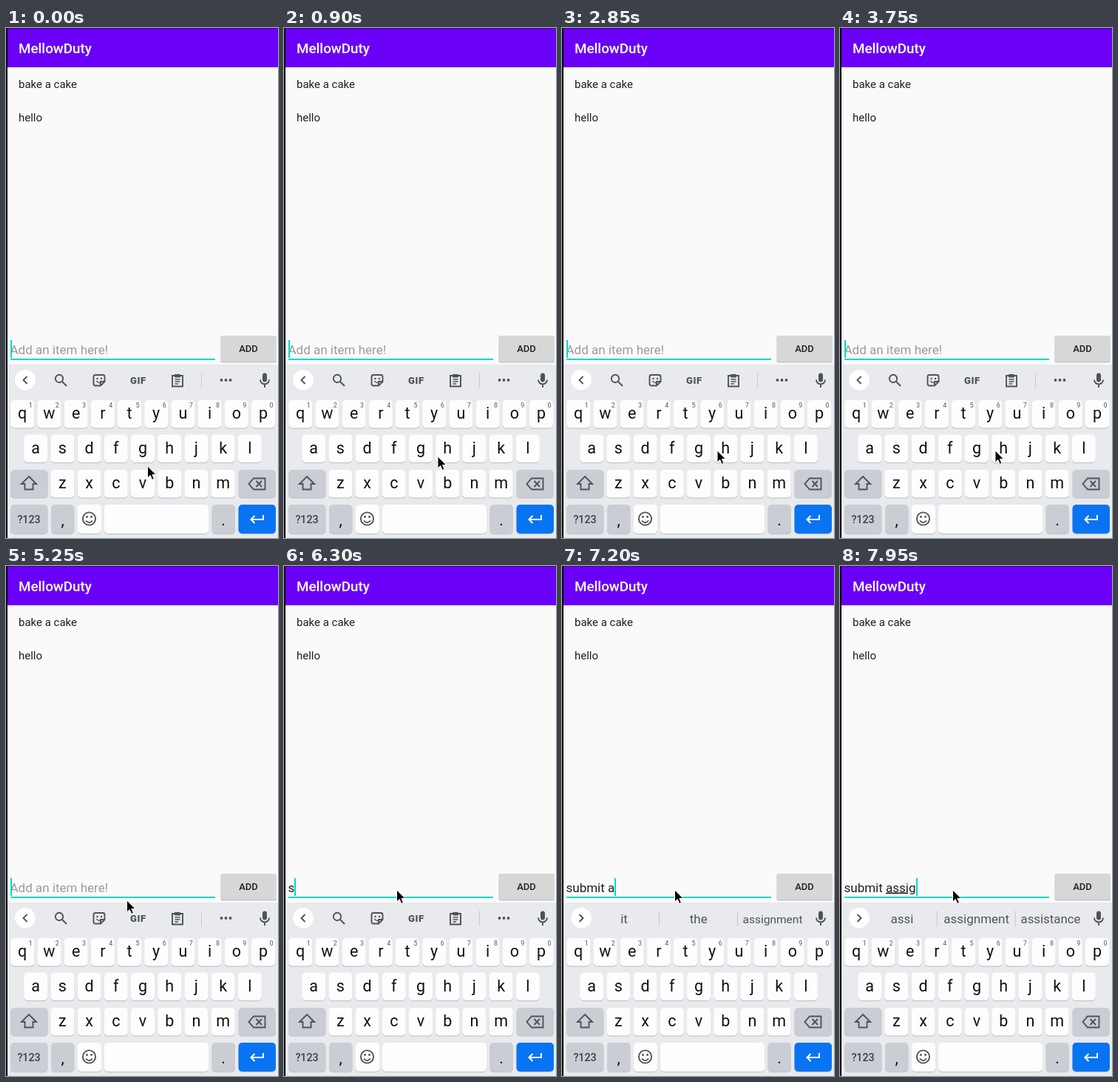
Write an HTML page that moves like this. It is 368 by 688 pixels and loops after 8 s.

```html
<!DOCTYPE html>
<html lang="en">
<head>
<meta charset="utf-8">
<title>Todo list</title>
<style>
  html, body { margin: 0; height: 100%; overflow: hidden; background: #fafafa; }
  svg { display: block; width: 100vw; height: 100vh; }
  text { font-family: Roboto, sans-serif; white-space: pre; }
  .mid { text-anchor: middle; }
  .medium { font-weight: 500; }
  .letter { font-size: 21.5px; fill: #111; }
  .digit { font-size: 9px; fill: #55595e; }
  .icon { fill: none; stroke: #4f5358; stroke-width: 1.9; }
  .solid { fill: #4f5358; }
  .rule { stroke: #c6c9ce; stroke-width: 1; }
  .composing { text-decoration: underline; text-decoration-skip-ink: none; }
  #suggestions text { fill: #505459; }
</style>
</head>
<body>
<svg viewBox="0 0 368 688">
  <rect width="368" height="688" fill="#fafafa"/>
  <rect width="368" height="53" fill="#6a00f8"/>
  <rect width="368" height="1" fill="#3c0a90"/>
  <text x="17" y="34" class="medium" font-size="18.8" fill="#fff">MellowDuty</text>
  <g font-size="15" fill="#202020">
    <text x="17" y="81">bake a cake</text>
    <text x="17" y="126">hello</text>
  </g>

  <g font-size="17">
    <text id="hint" x="5.5" y="439.5" fill="#9b9b9b">Add an item here!</text>
    <text id="entry" x="5.5" y="439.5" fill="#202020"><tspan id="plain"></tspan><tspan id="composing" class="composing"></tspan></text>
  </g>
  <rect x="6" y="446" width="277" height="2" fill="#03dac5"/>
  <rect id="caret" y="421" width="2" height="24" fill="#03dac5"/>
  <rect x="290.5" y="416" width="75.5" height="35.5" rx="2" fill="#c4c5c5"/>
  <rect x="290.5" y="415" width="75.5" height="35" rx="2" fill="#d6d7d7"/>
  <text x="328" y="437" class="mid medium" font-size="13" fill="#202020">ADD</text>

  <rect y="454" width="368" height="234" fill="#e8eaed"/>
  <circle cx="26" cy="475.6" r="14" fill="#d3d6da"/>
  <circle cx="26" cy="475" r="14" fill="#fff"/>
  <path id="chevron" class="icon"/>

  <g id="toolbar">
    <g class="icon">
      <circle cx="72" cy="473" r="5.2"/>
      <path d="M76 477L82 483"/>
      <path d="M121 468H131Q133.500 468 133.500 470.500V477L128 482.500H121Q118.500 482.500 118.500 480V470.500Q118.500 468 121 468ZM133 477H128V482"/>
      <path d="M122.500 476Q124 479 127 478.500" stroke-width="1.500"/>
      <path d="M225 469H239V483.500H225Z"/>
      <path d="M228.500 474H235.500M228.500 477H235.500M228.500 480H233" stroke-width="1.500"/>
    </g>
    <g class="solid">
      <circle cx="123.500" cy="473" r="1.200"/>
      <circle cx="129" cy="473" r="1.200"/>
      <rect x="228" y="467" width="8" height="4.500" rx="1"/>
      <circle cx="291.500" cy="475" r="1.900"/>
      <circle cx="297.500" cy="475" r="1.900"/>
      <circle cx="303.500" cy="475" r="1.900"/>
      <text x="178.800" y="479.500" class="mid" font-size="13" font-weight="900" letter-spacing=".5">GIF</text>
    </g>
    <path class="rule" d="M264.500 465V486"/>
  </g>
  <g id="suggestions">
    <path class="rule" d="M131.500 465V486M237.500 465V486"/>
    <text class="mid" x="84" y="481.500"></text>
    <text class="mid" x="184.700" y="481.500"></text>
    <text class="mid" x="285" y="481.500"></text>
  </g>
  <rect class="solid" x="347" y="465.500" width="6" height="12" rx="3"/>
  <path class="icon" d="M344 474.500A6 6 0 0 0 356 474.500M350 480.500V485"/>

  <g id="keys"></g>
  <g class="icon">
    <path d="M31 605L41 615H36.500V622.500H25.500V615H21Z"/>
    <path d="M335 607.500H350.500V622.500H335L328.500 615ZM338.500 611L346 619M346 611L338.500 619"/>
    <circle cx="112.500" cy="662" r="8.600"/>
    <path d="M108 664.500Q112.500 670 117 664.500"/>
  </g>
  <g class="solid">
    <circle cx="109.500" cy="659.500" r="1.400"/>
    <circle cx="115.500" cy="659.500" r="1.400"/>
  </g>
  <path d="M348 657V663H331.500M336.500 658L331.500 663L336.500 668" fill="none" stroke="#fff" stroke-width="2"/>
  <rect width="2" height="688" fill="#000"/>
  <path id="pointer" d="M0 0V16L3.700 12.500L6.200 18.400L8.900 17.200L6.400 11.500H11.500Z" fill="#000" stroke="#fff"/>
</svg>
<script>
const LOOP = 8000;
const $ = id => document.getElementById(id);
const slots = [...document.querySelectorAll('#suggestions text')];
const slotWidths = [90, 90, 81];

function add(tag, attributes, content = '') {
  const node = document.createElementNS($('keys').namespaceURI, tag);
  for (const [name, value] of Object.entries(attributes)) node.setAttribute(name, value);
  node.textContent = content;
  $('keys').append(node);
}

function addKey(x, y, width, height, fill = '#fdfdfe') {
  add('rect', { x, y: y + 1.2, width, height, rx: 5, fill: '#c3c6cb' });
  add('rect', { x, y, width, height, rx: 5, fill });
}

function addLabel(x, y, content, className = 'letter') {
  add('text', { x, y, class: 'mid ' + className }, content);
}

const letterRows = [
  ['qwertyuiop', 22.2, 502],
  ['asdfghjkl', 40.2, 548.5],
  ['zxcvbnm', 76.4, 596]
];
const PITCH = 36.2, GREY = '#cacdd3';
for (const [letters, start, top] of letterRows) {
  [...letters].forEach((letter, i) => {
    const x = start + i * PITCH;
    addKey(x - 16, top, 32, 37.5);
    addLabel(x, top + 25, letter);
    if (top === 502) addLabel(x + 11, 512, (i + 1) % 10, 'digit');
  });
}
addKey(6, 596, 50.5, 37.5, GREY);
addKey(314.5, 596, 50.5, 37.5, GREY);
addKey(6, 643, 50.5, 39, GREY);
addKey(61, 643, 31.5, 39, GREY);
addKey(97, 643, 32, 39);
addKey(133, 643, 141, 39);
addKey(278.5, 643, 31.5, 39, GREY);
addKey(314.5, 643, 50.5, 39, '#0874f2');
add('text', { x: 31, y: 668, class: 'mid medium', 'font-size': 14.2, fill: '#3c4043' }, '?123');
addLabel(76.5, 671, ',');
addLabel(294, 671, '.');

// time, x, y of the pointer tip
const pointerSteps = [
  [0, 191.5, 591], [750, 200, 584], [900, 208, 578], [1050, 214, 575],
  [1500, 213, 573], [1650, 212, 571], [1800, 212, 570], [2100, 211, 570],
  [2250, 210, 570], [5100, 194, 528], [5250, 163.5, 451], [5400, 155, 441], [5550, 152.5, 437]
];
const blinkTimes = [300, 750, 1350, 1800, 2250, 2850, 3300, 3750, 4350, 4800, 5400, 5850];

// time, finished text, word being composed, suggestions
const typingSteps = [
  [0, '', '', ''],
  [6300, 's', '', ''],
  [6450, '', 'su', 's so see'],
  [6750, '', 'sub', 'su sure sub'],
  [6900, '', 'submi', 'sub submit subject'],
  [7050, 'submit ', '', 'submit submits submitted'],
  [7200, 'submit a', '', 'it the assignment'],
  [7350, 'submit ', 'a', 'a and an'],
  [7500, 'submit ', 'as', 'a and an'],
  [7650, 'submit ', 'ass', 'as assignment ask'],
  [7800, 'submit ', 'assi', 'ass assignment assist'],
  [7950, 'submit ', 'assig', 'assi assignment assistance']
];

const latest = (steps, time) => steps.findLast(step => step[0] <= time);
const show = (id, visible) => $(id).setAttribute('visibility', visible ? 'visible' : 'hidden');
let shownTyping;

function applyTyping(step) {
  const [, plain, composing, words] = step;
  $('plain').textContent = plain;
  $('composing').textContent = composing;
  const width = plain + composing ? $('entry').getComputedTextLength() : 0;
  $('caret').setAttribute('x', Math.round(5.6 + width));
  show('hint', !(plain + composing));
  show('toolbar', !words);
  show('suggestions', words);
  $('chevron').setAttribute('d', words ? 'M23.5 470L28.5 475L23.5 480' : 'M28.5 470L23.5 475L28.5 480');
  slots.forEach((slot, i) => {
    slot.textContent = words.split(' ')[i] || '';
    slot.style.fontSize = '17px';
    const length = slot.textContent ? slot.getComputedTextLength() : 0;
    if (length > slotWidths[i]) slot.style.fontSize = 17 * slotWidths[i] / length + 'px';
  });
}

function draw(now) {
  const time = now % LOOP;
  const typing = latest(typingSteps, time);
  if (typing !== shownTyping) applyTyping(shownTyping = typing);
  const [, x, y] = latest(pointerSteps, time);
  $('pointer').setAttribute('transform', `translate(${x} ${y})`);
  show('caret', blinkTimes.filter(t => t <= time).length % 2 === 0);
}

const start = performance.now();
function tick() {
  draw(performance.now() - start);
  requestAnimationFrame(tick);
}
tick();
</script>
</body>
</html>
```
